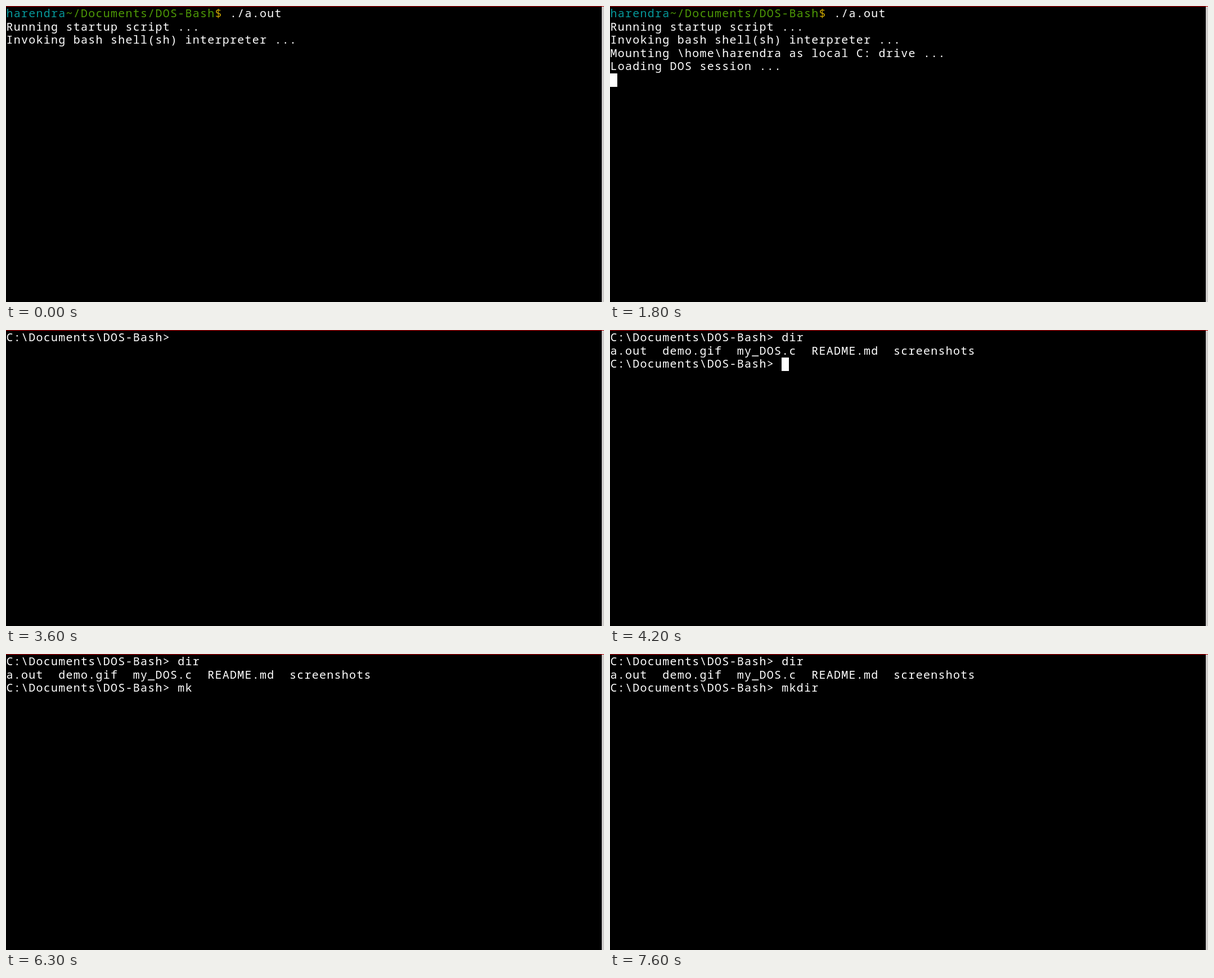
An HTML page for the animation above (8 s loop, 1063 by 527 pixels).

```html
<!DOCTYPE html>
<html lang="en">
<head>
<meta charset="utf-8">
<title>Terminal session</title>
<style>
  html, body { margin: 0; width: 100%; height: 100%; overflow: hidden; background: #000; }
  svg { display: block; width: 1063px; height: 527px; }
  text {
    font: 400 20px "Noto Sans Mono", "DejaVu Sans Mono", monospace;
    letter-spacing: 1.25px;
    white-space: pre;
    fill: #fff;
  }
</style>
</head>
<body>
<svg viewBox="0 0 1063 527">
  <rect width="1063" height="527" fill="#000"/>
  <rect x="1059" y="1" width="4" height="526" fill="#cfcdcb"/>
  <rect width="1063" height="1" fill="#c00003"/>
  <g id="lines"></g>
  <rect id="cursor" fill="#fff"/>
</svg>
<script>
const LOOP = 8000;
const CELL = 13.25, ROW = 23.6, TOP = 2;
const lines = document.getElementById("lines");
const cursor = document.getElementById("cursor");

const colX = col => Math.round(col * CELL);
const rowY = row => Math.round(TOP + row * ROW);

// A line is a list of [text, colour] runs.
const plain = text => [[text, "#fff"]];
const boot = [
  [["harendra", "#06989a"], ["~/Documents/DOS-Bash", "#4e9a06"], ["$", "#c4a000"], [" ./a.out", "#fff"]],
  plain("Running startup script ..."),
  plain("Invoking bash shell(sh) interpreter ..."),
  plain("Mounting \\home\\harendra as local C: drive ..."),
  plain("Loading DOS session ...")
];
const PROMPT = "C:\\Documents\\DOS-Bash> ";
const listing = "a.out  demo.gif  my_DOS.c  README.md  screenshots";

const booting = (count, on) => ({ lines: boot.slice(0, count), col: 0, row: count, on });

function typing(command, on, history = []) {
  const all = [...history, PROMPT + command];
  return { lines: all.map(plain), col: PROMPT.length + command.length, row: all.length - 1, on };
}
const second = (command, on) => typing(command, on, [PROMPT + "dir", listing]);

const steps = [
  [0, booting(3, false)],
  [200, booting(4, false)],
  [600, booting(4, true)],
  [1200, booting(5, false)],
  [1800, booting(5, true)],
  [2200, typing("", true)],
  [2400, typing("", false)],
  [3000, typing("", true)],
  [3600, typing("", false)],
  [3800, typing("d", true)],
  [3900, typing("di", true)],
  [4000, typing("dir", true)],
  [4200, second("", true)],
  [4800, second("", false)],
  [5400, second("", true)],
  [5500, second("m", true)],
  [5700, second("mk", true)],
  [6300, second("mk", false)],
  [6600, second("mk", true)],
  [6700, second("mkd", true)],
  [6800, second("mkdi", true)],
  [6900, second("mkdir", true)],
  [7100, second("mkdir ", true)],
  [7600, second("mkdir ", false)]
];

function addRun(text, fill, col, row) {
  const node = document.createElementNS("http://www.w3.org/2000/svg", "text");
  node.setAttribute("x", col * CELL + 0.5);
  node.setAttribute("y", rowY(row) + 18);
  node.style.fill = fill;
  node.textContent = text;
  lines.append(node);
}

function draw(state) {
  lines.replaceChildren();
  state.lines.forEach((runs, row) => {
    let col = 0;
    for (const [text, fill] of runs) {
      addRun(text, fill, col, row);
      col += text.length;
    }
  });
  const x = colX(state.col), y = rowY(state.row);
  cursor.setAttribute("x", x);
  cursor.setAttribute("y", y);
  cursor.setAttribute("width", colX(state.col + 1) - x);
  cursor.setAttribute("height", rowY(state.row + 1) - y);
  cursor.setAttribute("visibility", state.on ? "visible" : "hidden");
}

let shown = null;
function update() {
  const time = performance.now() % LOOP;
  const state = steps.findLast(([start]) => start <= time)[1];
  if (state !== shown) draw(shown = state);
  requestAnimationFrame(update);
}
update();
</script>
</body>
</html>
```
